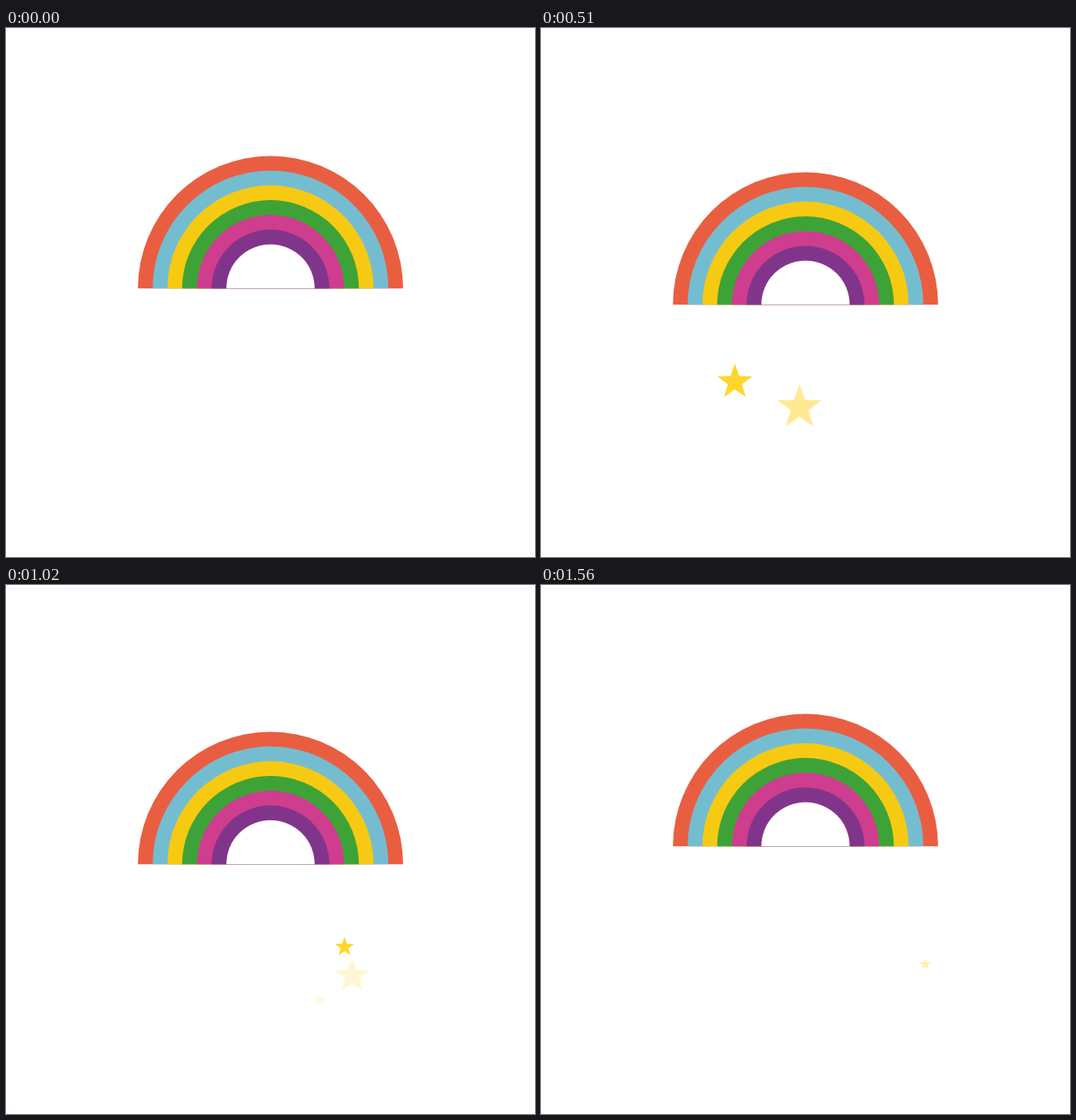
Animation, 618 px wide and 618 px high, one loop 1.59 s. Source, as an HTML page with a canvas:

```html
<!DOCTYPE html>
<html lang="en">
<head>
<meta charset="utf-8">
<title>Rainbow and falling stars</title>
<style>
  html, body { margin: 0; width: 100%; height: 100%; overflow: hidden; background: #fff; }
  canvas { display: block; }
</style>
</head>
<body>
<canvas id="stage" width="618" height="618"></canvas>
<script>
const SIZE = 618, STEP_MS = 30, STEPS = 53;
const ctx = document.getElementById('stage').getContext('2d');

const BANDS = ['#e95e40', '#74bdd1', '#f6ca12', '#3ea336', '#cf3d8e', '#81358a'];
const RAINBOW = { x: 309, y: 304.3, radius: 154.9, band: 17.22, drop: 30, turn: 27 };

// start and life are in steps, speed in pixels per step; top is the upper tip
const STARS = [
  { x: 189, radius: 18.6, start: 6.5, life: 10, top: 347.5, speed: 9 },
  { x: 302, radius: 27.2, start: 11.6, life: 10, top: 350.1, speed: 12.2 },
  { x: 226.5, radius: 21.5, start: 15.9, life: 11.3, top: 381.4, speed: 9.67 },
  { x: 366.5, radius: 6.8, start: 22.2, life: 14, top: 366.4, speed: 9.5 },
  { x: 404.5, radius: 21.5, start: 24, life: 12.3, top: 362.4, speed: 7.3 },
  { x: 395.5, radius: 12, start: 32.5, life: 18, top: 407, speed: 2.7 },
  { x: 449, radius: 7.1, start: 38, life: 22, top: 338, speed: 7 }
];

function drawRainbow(step) {
  const { x, y, radius, band, drop, turn } = RAINBOW;
  const progress = step < turn ? step / turn : (STEPS - step) / (STEPS - turn);
  const base = y + Math.round(drop * progress);
  [...BANDS, '#fff'].forEach((color, i) => {
    ctx.fillStyle = color;
    ctx.beginPath();
    ctx.arc(x, base, radius - i * band, Math.PI, 2 * Math.PI);
    ctx.fill();
  });
}

function drawStar({ x, radius, start, life, top, speed }, step) {
  const age = step - start;
  if (age < 0 || age >= life) return;
  const y = top + radius + age * speed;
  ctx.globalAlpha = 1 - age / life;
  ctx.fillStyle = '#ffd215';
  ctx.beginPath();
  for (let i = 0; i < 10; i++) {
    const r = i % 2 ? radius * 0.4 : radius;
    const angle = i * Math.PI / 5;
    ctx.lineTo(x + r * Math.sin(angle), y - r * Math.cos(angle));
  }
  ctx.fill();
  ctx.globalAlpha = 1;
}

function render() {
  const step = Math.floor((performance.now() - began) / STEP_MS) % STEPS;
  ctx.fillStyle = '#fff';
  ctx.fillRect(0, 0, SIZE, SIZE);
  drawRainbow(step);
  STARS.forEach(star => drawStar(star, step));
  requestAnimationFrame(render);
}

const began = performance.now();
render();
</script>
</body>
</html>
```
